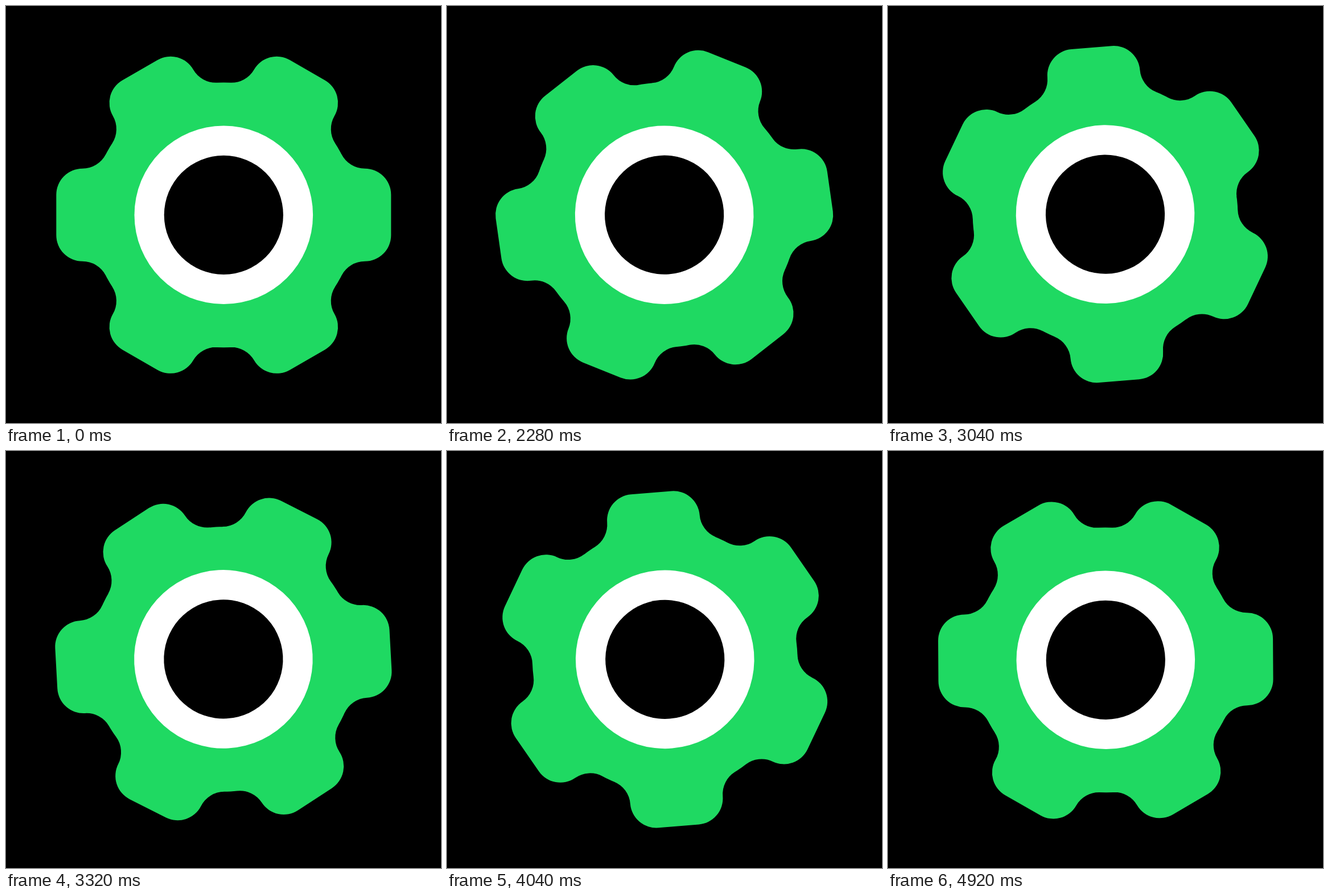
An HTML page with a canvas that plays this animation: 764x733 px, repeating every 4.96 s.

```html
<!DOCTYPE html>
<html>
<head>
<meta charset="utf-8">
<style>
html, body { margin: 0; width: 100%; height: 100%; overflow: hidden; background: #000; }
canvas { display: block; }
</style>
</head>
<body>
<canvas id="stage" width="764" height="733"></canvas>
<script>
const ctx = document.getElementById('stage').getContext('2d');
const { PI } = Math;
const LOOP = 4960, STEP = 40, EASE_FROM = 4700;

// Rotation in degrees at given times; the last stretch eases out.
const keys = [[2000, 20], [2600, 88.4], [3040, 145.3], [3600, 208.4], [4040, 265.3], [EASE_FROM, 344.3]];

function angleAt(t) {
  if (t < 2000) return 0;
  if (t >= EASE_FROM) return 360 - 15.7 * ((LOOP - t) / (LOOP - EASE_FROM)) ** 2;
  const i = keys.findIndex(k => k[0] > t);
  const [t0, a0] = keys[i - 1], [t1, a1] = keys[i];
  return a0 + (a1 - a0) * (t - t0) / (t1 - t0);
}

// Six rounded teeth, each joined to the base circle by concave fillets.
function makeGear() {
  const x = 248, corner = 35.5, r = 46, fillet = corner + 2 * r;
  const a = Math.atan2(fillet, x), base = Math.hypot(x, fillet) - r;
  const tooth = new Path2D();
  tooth.arc(x, -fillet, r, PI - a, PI / 2, true);
  tooth.arc(x, -corner, r, -PI / 2, 0);
  tooth.arc(x, corner, r, 0, PI / 2);
  tooth.arc(x, fillet, r, -PI / 2, a - PI, true);
  tooth.lineTo(0, 0);
  const gear = new Path2D();
  for (let i = 0; i < 6; i++) gear.addPath(tooth, new DOMMatrix().rotate(i * 60));
  gear.moveTo(base, 0);
  gear.arc(0, 0, base, 0, 2 * PI);
  return gear;
}

const gear = makeGear();

function disc(radius, color) {
  ctx.fillStyle = color;
  ctx.beginPath();
  ctx.arc(0, 0, radius, 0, 2 * PI);
  ctx.fill();
}

function draw(now) {
  const t = Math.floor(now % LOOP / STEP) * STEP;
  ctx.resetTransform();
  ctx.fillStyle = '#000';
  ctx.fillRect(0, 0, 764, 733);
  // The pivot sits slightly off the gear's centre.
  ctx.translate(382.1, 366.6);
  ctx.rotate(angleAt(t) * PI / 180);
  ctx.translate(0.2, 0.7);
  ctx.fillStyle = '#1fd962';
  ctx.fill(gear);
  disc(156.8, '#fff');
  disc(104.6, '#000');
}

const start = performance.now();
function frame() {
  draw(performance.now() - start);
  requestAnimationFrame(frame);
}
frame();
</script>
</body>
</html>
```
